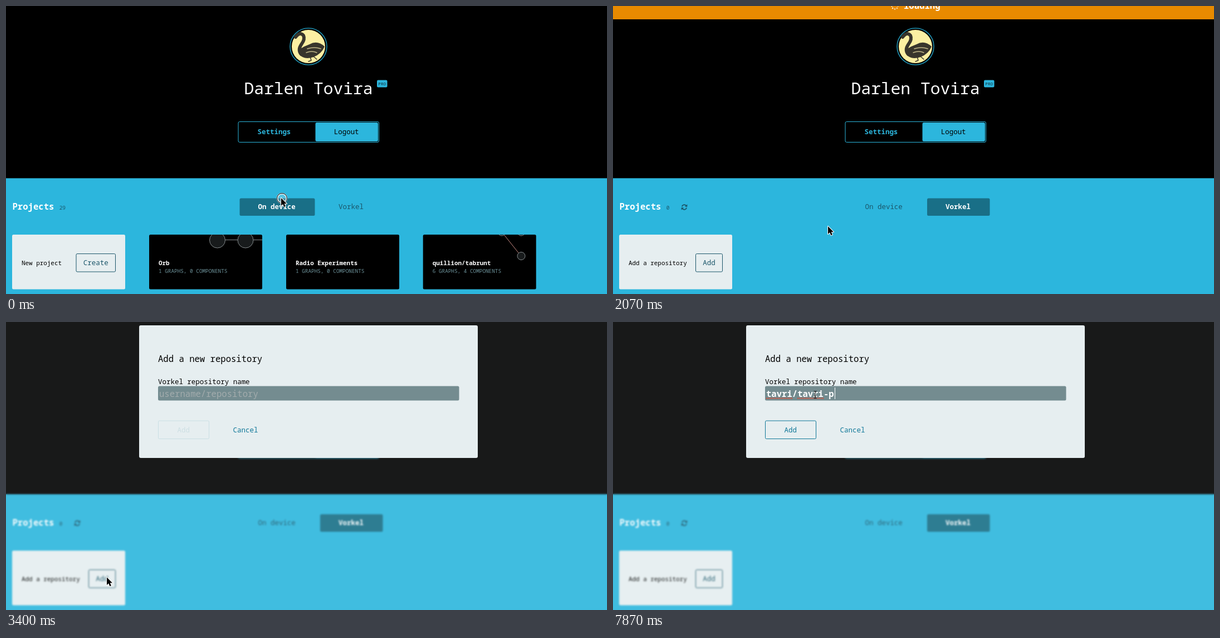
An HTML page with a canvas that plays this animation: 1079x519 px, repeating every 8 s.

```html
<!DOCTYPE html>
<html lang="en">
<head>
<meta charset="utf-8">
<title>Add a repository</title>
<style>
  html, body { margin: 0; width: 100%; height: 100%; overflow: hidden; background: #000; }
  canvas { display: block; }
</style>
</head>
<body>
<canvas id="stage" width="1079" height="519"></canvas>
<script>
const W = 1079, H = 519, LOOP = 8000, TICK = LOOP / 54;
const BLUE = '#2cb6dd', DARK = '#196f87', TEAL = '#1b566a', PALE = '#e6eef0', LINK = '#0f7798';
const BASE = 12.48, BIG = 15.6, SMALL = 10.92, TINY = 9.36;

const SWITCH = 7, MODAL = 23, FOCUS = 33, TYPING = 41;
const CLICKS = [0, 6, 21, FOCUS];
const HOST = 'Vorkel', ENTRY = 'tavri/tavri-p';
const TYPED = [[41, 1], [42, 2], [43, 3], [44, 5], [45, 6], [47, 7], [48, 8], [49, 9], [50, 11], [51, 12], [53, 13]];
const PATH = [
  [0, 494, 346], [1, 500, 347], [5, 612, 363], [6, 617, 363], [8, 617, 363],
  [9, 608, 365], [14, 386, 397], [16, 286, 440], [19, 200, 458], [21, 181, 460],
  [25, 181, 460], [26, 192, 438], [31, 363, 134], [33, 363, 131]
];

const stage = document.getElementById('stage').getContext('2d');
const layer = Object.assign(document.createElement('canvas'), { width: W, height: H });
let g = stage;

const clamp = v => Math.max(0, Math.min(1, v));

function rect(x, y, w, h, color) {
  g.fillStyle = color;
  g.fillRect(x, y, w, h);
}

function box(x, y, w, h, fill, stroke, r = 2.5) {
  g.beginPath();
  g.roundRect(x, y, w, h, r);
  if (fill) { g.fillStyle = fill; g.fill(); }
  if (stroke) { g.strokeStyle = stroke; g.lineWidth = 1; g.stroke(); }
}

function disc(x, y, r, fill, stroke, width = 1) {
  g.beginPath();
  g.arc(x, y, r, 0, 7);
  if (fill) { g.fillStyle = fill; g.fill(); }
  if (stroke) { g.strokeStyle = stroke; g.lineWidth = width; g.stroke(); }
}

function line(x1, y1, x2, y2, color, width = 1) {
  g.beginPath();
  g.moveTo(x1, y1);
  g.lineTo(x2, y2);
  g.strokeStyle = color;
  g.lineWidth = width;
  g.stroke();
}

function text(str, x, y, size, color, weight = 400, align = 'left') {
  g.font = `${weight} ${size}px "Noto Sans Mono", "Liberation Mono", monospace`;
  g.textAlign = align;
  g.fillStyle = color;
  g.fillText(str, x, y);
}

function avatar() {
  disc(543, 73, 33, '#000', '#1f8fae', 1.6);
  disc(543, 73, 30, '#fbefa2');
  g.strokeStyle = g.fillStyle = '#38352c';
  g.lineCap = g.lineJoin = 'round';
  g.lineWidth = 6;
  g.stroke(new Path2D('M520 56 Q527 46 534 53 Q537 60 531 68 Q523 79 530 87'));
  g.fill(new Path2D('M527 78 Q536 72 545 69 Q559 61 572 73 Q567 86 552 92 Q534 98 526 86 Z'));
  g.lineWidth = 1.5;
  g.stroke(new Path2D('M546 91 L548 98 L543 100 M552 91 L558 96'));
  g.strokeStyle = '#c3b98a';
  g.stroke(new Path2D('M541 77 Q554 73 565 77 M539 84 Q549 80 558 84'));
  g.lineCap = 'butt';
}

function refreshIcon(x, y) {
  g.save();
  g.translate(x, y);
  for (let i = 0; i < 2; i++) {
    g.beginPath();
    g.arc(0, 0, 4.3, Math.PI + 0.25, -0.55);
    g.strokeStyle = g.fillStyle = TEAL;
    g.lineWidth = 1.7;
    g.stroke();
    g.fill(new Path2D('M5.4 -5.2 V-0.8 H1 Z'));
    g.rotate(Math.PI);
  }
  g.restore();
}

function card(x, title, info, graph) {
  g.save();
  box(x, 412, 203, 98.5, '#000');
  g.clip();
  if (graph) graph();
  text(title, x + 17, 466.5, SMALL, '#fff', 700);
  text(info, x + 17, 481, TINY, '#6d929a');
  g.restore();
}

const node = (x, y, r) => disc(x, y, r, '#181b1c', '#858b8d');

function bigNodes() {
  line(379, 421.5, 460, 421.5, '#858b8d');
  node(379.5, 422, 14);
  node(430, 422, 14);
}

function smallNodes() {
  line(890, 407, 925, 451, '#c98b83');
  node(890, 407, 7);
  node(925, 407, 7);
  node(925, 450.5, 7);
}

function tab(label, x, w, textX, active) {
  if (active) box(x, 346.5, w, 31.5, DARK);
  text(label, textX, 366, BASE, active ? '#fff' : TEAL, active ? 700 : 400);
}

function newCard(label, button, x) {
  box(11, 412, 203, 98.5, PALE);
  text(label, 28, 466.5, SMALL, '#000');
  box(x, 446.5, 196.5 - x, 32.5, null, TEAL, 2);
  text(button, (x + 196.5) / 2, 466.5, BASE, TEAL, 400, 'center');
}

function page(remote) {
  rect(0, 0, W, 310.5, '#000');
  rect(0, 310.5, W, H, BLUE);
  avatar();
  text('Darlen Tovira', 543, 159, 29.64, '#fff', 400, 'center');
  box(666, 133.5, 18.5, 13, BLUE, null, 2);
  text('PRO', 675.2, 143, 7.6, '#0b2a34', 400, 'center');
  box(417, 208.5, 252.5, 37, null, BLUE);
  box(555.5, 210, 112.5, 34, BLUE);
  text('Settings', 451.5, 231, BASE, BLUE, 700);
  text('Logout', 588.7, 231, BASE, '#000');

  text('Projects', 11.5, 367, BIG, '#fff', 700);
  text(remote ? '0' : '29', 95.7, 367, TINY, TEAL);
  tab('On device', 419.5, 135, 452.5, !remote);
  tab(HOST, 564, 112.5, 597, remote);
  if (remote) {
    refreshIcon(128, 362.5);
    newCard('Add a repository', 'Add', 148.5);
  } else {
    newCard('New project', 'Create', 126);
    card(257, 'Orb', '1 GRAPHS, 0 COMPONENTS', bigNodes);
    card(503, 'Radio Experiments', '1 GRAPHS, 0 COMPONENTS');
    card(748.7, 'quillion/tabrunt', '6 GRAPHS, 4 COMPONENTS', smallNodes);
  }
}

function loadingBar(tick) {
  const bottom = 48 * clamp(Math.min(tick - 9, 15 - tick) / 2);
  if (!bottom) return;
  rect(0, 0, W, bottom, '#e88a00');
  text('loading', 522, bottom - 19.5, BIG, '#fff', 700);
  for (let i = 0; i < 8; i++) {
    const a = (i + tick) * Math.PI / 4;
    disc(506 + 5.5 * Math.cos(a), bottom - 24 + 5.5 * Math.sin(a), 1.3, `rgba(255,255,255,${0.4 + i * 0.08})`);
  }
}

function squiggle(x1, x2) {
  g.setLineDash([2, 1.2]);
  line(x1, 137.5, x2, 137.5, '#dc4a32', 2);
  g.setLineDash([]);
}

function blurredPage() {
  g = layer.getContext('2d');
  page(true);
  g = stage;
  rect(0, 0, W, 310.5, '#000');
  rect(0, 310.5, W, H, BLUE);
  g.filter = 'blur(1.5px)';
  g.drawImage(layer, 0, 0);
  g.filter = 'none';
  rect(0, 0, W, H, 'rgba(230,240,242,.1)');
}

function modal(tick) {
  const count = TYPED.reduce((n, [at, c]) => tick >= at ? c : n, 0);
  const step = BIG * 0.6, left = 275;
  blurredPage();
  box(239, 6, 608, 239, PALE, null, 3);
  text('Add a new repository', 273, 72, BIG, '#000');
  text(HOST + ' repository name', 273, 111.5, BASE, '#000');
  box(273, 115.5, 540.5, 26, '#748c90');
  if (count) text(ENTRY.slice(0, count), left, 134.5, BIG, '#fff', 700);
  else text('username/repository', left, 134.5, BIG, '#a3acad');
  if (count > 5) squiggle(left, left + 5 * step);
  if (count > 11) squiggle(left + 6 * step, left + 11 * step);

  const blinkOff = tick >= 36 && tick < 39;
  if (tick >= FOCUS && !blinkOff) rect(Math.round(left + 0.9 + count * step), 118, 1, 21, '#fff');

  const ready = tick >= TYPING;
  box(273.5, 178, 91, 32.5, null, ready ? LINK : '#c9dfe4', 2);
  text('Add', 318.7, 198.5, BASE, ready ? LINK : '#cddfe3', 400, 'center');
  text('Cancel', 407.5, 198.5, BASE, LINK);
}

function cursorAt(tick) {
  const next = PATH.findIndex(p => p[0] > tick);
  if (next < 0) return PATH[PATH.length - 1].slice(1);
  const [t0, x0, y0] = PATH[next - 1], [t1, x1, y1] = PATH[next];
  const k = (tick - t0) / (t1 - t0);
  return [x0 + (x1 - x0) * k, y0 + (y1 - y0) * k];
}

const ARROW = new Path2D('M0 0 V14 L3.2 11.1 L5.4 16.2 L7.9 15.1 L5.7 10.2 H10 Z');
const HAND = new Path2D('M-1.5 0.5 Q0 -1.5 1.5 0.5 V5 L6 6 Q8 6.5 8 8.5 L7 12 V15 H0 L-4 9 Q-4 7 -1.5 9 Z');
const BEAM = new Path2D('M-2.5 -6.5 Q0 -6.5 0 -5 Q0 -6.5 2.5 -6.5 M0 -5 V5 M-2.5 6.5 Q0 6.5 0 5 Q0 6.5 2.5 6.5 M-1.5 2.5 H1.5');

function pointer(tick) {
  const [x, y] = cursorAt(tick);
  if (CLICKS.includes(tick)) {
    disc(x + 1.5, y + 0.5, 8.5, 'rgba(255,255,255,.2)', '#fff', 3);
    disc(x + 1.5, y + 0.5, 9, null, '#17323c', 1.3);
  }
  const overInput = tick >= MODAL && y > 115 && y < 141;
  const overHost = tick < MODAL && x > 564 && x < 677 && y > 346 && y < 378;
  g.save();
  g.translate(x, y);
  g.lineJoin = 'round';
  if (overInput) {
    g.strokeStyle = '#111';
    g.lineWidth = 1.1;
    g.stroke(BEAM);
  } else {
    const shape = overHost ? HAND : ARROW;
    g.lineWidth = overHost ? 1.6 : 2;
    g.strokeStyle = overHost ? '#111' : '#fff';
    g.stroke(shape);
    g.fillStyle = overHost ? '#fff' : '#000';
    g.fill(shape);
  }
  g.restore();
}

function draw(now) {
  const tick = Math.floor((now % LOOP + 14) / TICK) % 54;
  if (tick >= MODAL) {
    modal(tick);
  } else {
    page(tick >= SWITCH);
    loadingBar(tick);
  }
  pointer(tick);
}

const start = performance.now();
function frame() {
  draw(performance.now() - start);
  requestAnimationFrame(frame);
}
frame();
</script>
</body>
</html>
```
